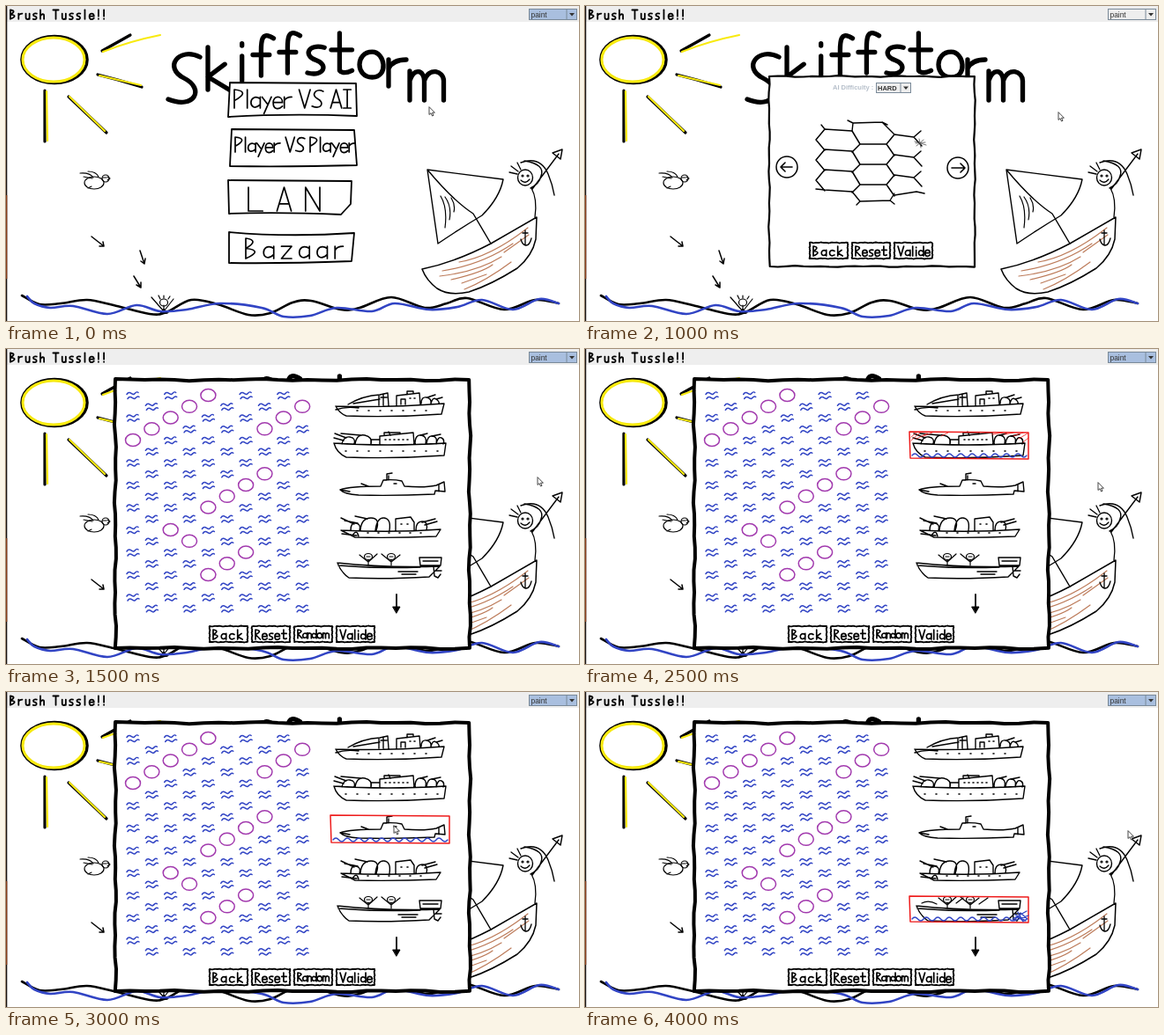
An HTML page for the animation above (4500 ms loop, 650 by 358 pixels).

```html
<!DOCTYPE html>
<html lang="en">
<head>
<meta charset="utf-8">
<title>Brush Tussle</title>
<style>
html, body { margin: 0; width: 100%; height: 100%; overflow: hidden; background: #fff; }
svg { display: block; width: 650px; height: 358px; }
path, ellipse { fill: none; stroke-linecap: round; stroke-linejoin: round; }
text { font-family: "Liberation Sans", Arial, sans-serif; font-size: 8.4px; }
.small { font-size: 7.5px; font-weight: bold; }
</style>
</head>
<body>
<svg id="stage" viewBox="0 0 650 358"></svg>
<script>
const BLUE = '#3144c4', PURPLE = '#a23aae', RED = '#ee1c1c', YELLOW = '#f8ea10', BROWN = '#bd7c5b';

// Single-stroke handwriting: cap height 10, baseline at y = 10.
const UPPER = {
  A: 'M0 10L3 0 6 10M1 7H5', B: 'M0 0V10M0 0Q7 1 0 5Q9 6 0 10', I: 'M0 0H4M2 0V10M0 10H4',
  L: 'M0 0V10H6', N: 'M0 10V0L6 10V0', P: 'M0 0V10M0 0Q9 1 0 6', R: 'M0 10V0Q8 1 0 5L5 10',
  S: 'M6 1C2-1-1 3 3 5S5 11 0 9', T: 'M0 0H6M3 0V10', V: 'M0 0L3 10 6 0', '!': 'M1 0V7M1 9.5V10'
};
const LOWER = {
  a: 'M5 5C2 3 0 5 0 7S2 11 5 8M5 4V10', c: 'M5 5C2 3 0 5 0 7S2 11 5 9',
  d: 'M5 6C2 3 0 5 0 7S2 11 5 8M5 0V10', e: 'M0 7H5C5 3 0 3 0 7S3 11 5 9',
  f: 'M5 1C2-1 2 2 2 4V10M0 5H4', h: 'M0 0V10M0 7C1 4 4 4 4 6V10', i: 'M1 4V10M1 1V1.5',
  k: 'M0 0V10M4 4L0 7 5 10', l: 'M1 0V10', m: 'M0 4V10M0 6C1 3 3 4 3 6V10M3 6C4 3 7 4 7 6V10',
  n: 'M0 4V10M0 6C1 3 4 4 4 6V10', o: 'M3 4C-1 4-1 10 3 10S6 4 3 4', r: 'M0 4V10M0 6Q1 4 4 4',
  s: 'M4 4C0 3-1 6 2 7S4 11 0 10', t: 'M2 0V9Q3 10 5 9M0 4H5', u: 'M0 4V8C0 11 4 11 4 8V4V10',
  y: 'M0 4L3 8M5 4L1 13', z: 'M0 4H5L0 10H5'
};
const GLYPHS = { ...UPPER, ...LOWER };
const WIDTHS = { ' ': 2, '!': 2, i: 2, l: 2, I: 4, h: 4, n: 4, r: 4, s: 4, u: 4, A: 6, L: 6, N: 6, S: 6, T: 6, V: 6, o: 6, m: 7 };

const path = (d, width = 1.4, color = '#000', more = '') =>
  `<path d="${d}" stroke="${color}" stroke-width="${width}" ${more}/>`;
const oval = (x, y, rx, ry = rx, width = 1.4, color = '#000') =>
  `<ellipse cx="${x}" cy="${y}" rx="${rx}" ry="${ry}" stroke="${color}" stroke-width="${width}"/>`;
const glyph = (c, x, y, scale, width) =>
  path(GLYPHS[c], width / scale, '#000', `transform="translate(${x} ${y}) scale(${scale})"`);

function write(text, x, y, scale, gap, width = 1.7) {
  let out = `<g role="img" aria-label="${text}">`;
  for (const c of text) {
    if (c !== ' ') out += glyph(c, x, y, scale, width);
    x += ((WIDTHS[c] || 5) + gap) * scale;
  }
  return out + '</g>';
}

// Smooth curve through a flat list of x, y pairs.
function curve(list) {
  const n = list.length / 2;
  const at = i => { const k = 2 * Math.max(0, Math.min(n - 1, i)); return [list[k], list[k + 1]]; };
  let d = 'M' + at(0);
  for (let i = 0; i < n - 1; i++) {
    const [a, b, c, e] = [at(i - 1), at(i), at(i + 1), at(i + 2)];
    d += `C${b.map((v, k) => v + (c[k] - a[k]) / 6)} ${c.map((v, k) => v - (e[k] - b[k]) / 6)} ${c}`;
  }
  return d;
}

// Hand-drawn box: straight sides with a slight wobble.
function sketchBox(x, y, w, h, width, wobble) {
  const points = [];
  const side = (x0, y0, dx, dy) => {
    for (let i = 0; i < 24; i++) {
      const k = i / 24, shake = wobble * (Math.sin(i * 1.9 + x0) + Math.sin(i * 0.8 + y0)) / 2;
      points.push([x0 + dx * k + (dx ? 0 : shake), y0 + dy * k + (dy ? 0 : shake)].map(v => v.toFixed(1)));
    }
  };
  side(x, y, w, 0); side(x + w, y, 0, h); side(x + w, y + h, -w, 0); side(x, y + h, 0, -h);
  return path(`M${points.join('L')}Z`, width, '#000', 'style="fill:#fff"');
}

const label = (text, x, y, more = '') => `<text x="${x}" y="${y}" ${more}>${text}</text>`;
const combo = (x, y, w, h, fill) =>
  `<rect x="${x}" y="${y}" width="${w}" height="${h}" fill="${fill}" stroke="#7a8a99"/>` +
  `<path d="M${x + w - 11.5} ${y}v${h}" stroke="#7a8a99"/>` +
  `<path d="M${x + w - 8.5} ${y + h / 2 - 1.5}h6l-3 3.5z" style="fill:#333"/>`;
const group = (id, content) => `<g id="${id}">${content}</g>`;

function scenery() {
  const rays = path('M109 51L141 33M104 78L127 84 154 92M71 103L114 144M44 96V154', 3.2) +
    path('M110 52Q140 40 175 33M106 79L153 90M72 103L112 142M46 97L47 153', 2.2, YELLOW);
  const sun = oval(55, 61, 37, 26.5, 3.6) + oval(54, 61, 35, 25, 3, YELLOW) + rays;
  const bird = oval(100, 201, 11, 7, 1.2) + oval(113, 196, 4, 4, 1.2) +
    path('M84 190Q95 189 99 195M88 194L98 196M93 188Q102 188 105 194M115 194L118 196 115 198M93 207L97 205M110 195H114', 1.1);
  const darts = path('M97 262L111 273M106 273L111 273 110 268M152 278L157 293M153 290L157 293 158 287M145 307L153 320M148 317L153 320 153 314', 1.5);
  const swimmer = oval(179, 337, 4.5, 4, 1.2) +
    path('M165 331L179 347 190 333M179 340V349M175 333L173 329M179 332V329M184 333L186 330', 1.2) +
    path('M175 349L179 344 183 349Z', 1, '#000', 'style="fill:#000"');
  const sea = path(curve([18,329, 38,339, 62,338, 92,334, 122,340, 163,350, 182,348, 210,334, 240,339, 275,351, 300,349,
      325,337, 346,335, 380,345, 401,343, 437,331, 475,343, 500,338, 523,332, 565,345, 600,334, 627,338]), 2.6) +
    path(curve([24,330, 32,338, 50,343, 76,341, 115,350, 148,340, 175,347, 205,345, 243,338, 290,343, 315,353,
      345,352, 375,343, 415,347, 441,338, 480,345, 512,342, 540,334, 575,345, 605,333, 627,338]), 2.6, BLUE);
  const sail = path('M478 186L564 197Q560 218 540 238Q515 253 490 270L478 186M478 186Q507 221 530 236L550 270', 1.4) +
    path('M493 216Q501 229 498 252M498 217Q506 228 503 243M505 218Q510 226 508 234', 1.2);
  const hull = path('M472 299Q510 291 550 270L602 240 601 265Q597 284 580 298Q550 317 525 325Q503 330 489 321Q477 312 472 299', 1.5) +
    path('M514 291Q550 285 592 252M495 301Q540 294 575 270M492 307Q535 302 562 285M505 311Q540 303 552 294M517 315L545 305M520 322Q545 312 573 291M565 280L593 260', 1.2, BROWN) +
    path('M589 255V272M584 265Q586 272 590 272T596 264M586 258H592', 1.3);
  const archer = oval(589, 195, 8.5, 9, 1.4) + oval(586, 193, 1, 1, 1.2) + oval(592, 193, 1, 1, 1.2) +
    path('M584 198Q589 203 594 197M581 188L573 182M580 191L571 189M584 186L580 178M600 240Q603 219 596 207', 1.3) +
    path('M584 178Q606 170 615 191Q620 203 622 215M588 176Q612 180 607 193Q605 202 595 207M597 208L627 168M620 167L631 163 629 174Z', 1.4);
  return sun + bird + darts + swimmer + sea + sail + hull + archer;
}

function menu() {
  const box = d => path(d, 1.8, '#000', 'style="fill:#fff"');
  return box('M254 87L397 88 398 125Q320 122 252 126Z') + write('Player VS AI', 259, 95, 2.1, 1) +
    box('M256 140L395 141 398 181Q320 183 254 182Z') + write('Player VS Player', 260, 149, 1.7, 0.8) +
    box('M252 198L392 199 391 225 380 237Q310 234 253 236Z') + write('LAN', 275, 206, 2.7, 6) +
    box('M253 257Q320 263 395 258L392 290Q310 293 253 292Z') + write('Bazaar', 272, 264, 2.3, 3.8);
}

const title = () => [['S', 184, 52, 6], ['k', 229, 47, 4.8], ['i', 263, 38, 4.7], ['f', 280, 32, 4.7], ['f', 310, 29, 4.7],
  ['s', 342, 28, 4.8], ['t', 369, 31, 4.7], ['o', 401, 33, 4.8], ['r', 434, 41, 5], ['m', 458, 52, 5.5]]
  .map(l => glyph(...l, 5.3)).join('');

const button = (text, x, y, gap, scale = 1.1) => sketchBox(x, y, 43, 18, 1.8, 0.5) + write(text, x + 4, y + 4, scale, gap);

function mapDialog() {
  let hexes = path('M303 142L304 133 337 132 351 146M304 133L298 130M337 132L343 135M272 140L268 135M303 211L312 222 346 221 351 213M312 222L308 226M346 221L351 225');
  for (let i = 0; i < 4; i++) {
    const edges = i < 3
      ? 'M262 152L272 140 303 142 312 157 342 157 351 146 373 149 381 142M262 152L272 164M312 157L303 166M342 157L351 170M373 149L382 159'
      : 'M262 139L272 140 303 142M351 146L376 142 385 144';
    hexes += path(edges, 1.5, '#000', `transform="translate(0 ${23 * i})"`);
  }
  hexes += path('M374 154L387 158M376 159L384 152M379 151L381 161M375 156L386 155', 0.8, '#555');
  return sketchBox(209, 80, 233, 216, 2.2, 0.8) +
    label('AI Difficulty :', 281, 95, 'class="small" fill="#b6bfca"') +
    combo(330.5, 87.5, 39, 11, '#eee') + label('HARD', 332, 96, 'class="small" fill="#333"') +
    hexes + oval(229, 183, 12, 12, 1.5) + oval(423, 184, 12, 12, 1.5) +
    path('M222 183H235M227 178L222 183 227 188M416 184H431M426 179L431 184 426 189', 1.6) +
    button('Back', 255, 269, 3.4) + button('Reset', 303, 269, 2) + button('Valide', 351, 269, 1.6);
}

function ships() {
  const portholes = (x, y, n, step) => path(Array.from({ length: n }, (_, i) => `M${x + i * step} ${y}h1`).join(''), 1.6);
  const cruiser = path('M374 65Q430 67 497 62L494 74Q440 78 386 76Q378 73 374 65M374 69Q385 65 400 67M388 63Q405 53 424 52L433 50 434 64M394 62L424 57M423 52V64M428 51V64M432 55H425M443 64V53L469 50 470 63M448 63V57H453V63M455 52V48H462V51M471 62Q471 54 477 55T482 62M482 62Q484 54 488 57T491 62M478 55L487 52M488 57L495 55') +
    portholes(398, 70, 7, 13) + portholes(458, 56, 2, 5);
  const destroyer = path('M372 107Q430 111 499 107L497 121Q440 125 386 123Q375 118 372 107M381 108Q383 99 390 100T395 108M396 108Q398 96 407 98T414 108M414 108V103H424M424 108V99L462 95 463 108M429 98V95H447V97M464 108Q464 97 471 98T476 108M477 108Q478 98 484 99T488 108M488 108Q490 99 494 101T496 108') +
    path('M386 101L373 96M383 104L372 101M402 98L380 96M470 98L478 96M483 99L493 97M436 98L434 94') +
    portholes(385, 116, 9, 13) + portholes(430, 103, 6, 5);
  const submarine = path('M379 160Q390 156 425 156L428 149Q440 148 449 150L452 156Q475 158 488 155L497 151 498 162 487 161 486 165Q440 167 400 166Q384 165 379 160M432 149V142L438 141M434 149V144M403 153L411 156M491 154V162M379 160L390 162M440 153H443');
  const gunboat = path('M380 206Q440 209 493 205L488 213Q440 215 396 214L380 206M391 206Q391 197 397 198T401 206M402 206Q403 192 414 192T420 206M419 206Q421 191 429 192T435 206M442 206V193L459 191 463 197V206M465 206Q465 196 472 196T477 206') +
    path('M395 199L380 192M399 198L384 195M410 193L396 190M472 197L487 193M475 200L489 196M381 210L398 212M393 212Q398 204 400 213') +
    portholes(410, 209, 6, 12) + portholes(448, 199, 2, 7);
  const boat = path('M376 243Q430 249 492 247L480 259Q430 262 389 260Q380 254 376 243M377 246Q425 250 470 248M469 237H494L493 246H470ZM473 241H490M485 247L486 258 490 260 493 256M488 252H494M445 253H467M449 256H465') +
    oval(411, 236, 4.5, 3.5, 1.2) + oval(437, 236, 4.5, 3.5, 1.2) +
    path('M411 240V246M401 234L411 242 421 233M437 240V246M426 233L437 242 447 234M409 236H413M435 236H439', 1.2);
  return cruiser + destroyer + submarine + gunboat + boat;
}

function fleetPanel() {
  const hits = new Set('40 30 21 11 02 90 81 71 73 64 54 45 26 36 67 57 48'.split(' '));
  let cells = '';
  for (let col = 0; col < 10; col++) for (let row = 0; row < 10; row++) {
    const x = 144 + col * 21.35, y = 52.5 + row * 25.5 + (col % 2) * 12.8;
    cells += hits.has(`${col}${row}`) ? oval(x, y, 8.5, 7, 1.5, PURPLE)
      : path('M-7-1C-4-6-1 0 1-1S4-5 6-3M-6 4C-3-1 0 5 2 4S5 0 7 2', 1.5, BLUE, `transform="translate(${x} ${y})"`);
  }
  return sketchBox(124, 35, 402, 305, 4, 1.2) + cells + ships() +
    path('M443 279V296', 1.8) + path('M439 293H447L443 300Z', 1, '#000', 'style="fill:#000"') +
    button('Back', 231, 315, 3.4) + button('Reset', 279, 315, 2) + button('Random', 327, 315, 0.9, 0.97) + button('Valide', 375, 315, 1.6);
}

// Red frame around one ship, with water under it.
function highlight(y, h, extra = '') {
  const water = 'q3-4 6.5 0t6.5 0'.repeat(10);
  return path(`M368 ${y}L503 ${y + 1} 503 ${y + h} 369 ${y + h - 1}Z`, 1.5, RED) +
    path(`M371 ${y + h - 4}${water}`, 1.3, BLUE) + extra;
}
const burst = (x, y) => path(`M${x - 6} ${y}q5-6 12-2q-4 6-11 3l9-5m-8 0l7 5`, 1, RED);
const highlights = [
  highlight(48, 31),
  highlight(94, 31, path('M370 104L380 95M370 100L376 95M376 102L388 96M384 99L394 95M404 99L412 95M462 97L474 95M476 97L486 95M486 99L497 95M492 102L502 96M497 106L503 101', 0.8, RED)),
  highlight(140, 32),
  highlight(186, 30, burst(378, 192) + burst(404, 190) + burst(488, 191) + path('M488 197L498 193M490 213L503 207', 1, RED)),
  highlight(232, 30, path('M485 258L501 249M487 260L503 254M488 253L500 260M491 250L497 261M494 251L502 258', 1.3, BLUE) +
    path('M421 240L429 234M447 241L457 234M382 240Q390 236 399 241', 1.2))
];

const stage = document.getElementById('stage');
stage.innerHTML = '<rect width="650" height="358" fill="#fff"/>' + scenery() + title() +
  group('menu', menu()) + group('mapDialog', mapDialog()) + group('fleetPanel', fleetPanel()) + group('highlight', '') +
  '<rect width="650" height="18" fill="#eee"/><rect width="1.3" height="358" fill="#17110f"/><rect y="215" width="1.3" height="95" fill="#8a3d18"/>' +
  write('Brush Tussle!!', 5, 4.5, 1.03, 4, 1.8) +
  group('theme', '') + label('paint', 595.5, 12.5, 'fill="#333"') +
  '<path id="cursor" d="M0 0V8.5L2 6.7 3.5 10 5 9.3 3.5 6.2H6Z" stroke="#333" stroke-width=".9" style="fill:#fff"/>';

const STEP = 500;
const cursorStops = [[480, 115], [508, 119], [537, 121], [603, 146], [444, 60], [582, 152], [440, 152], [433, 189], [616, 158]];
const el = id => document.getElementById(id);
let shown = -1;

function draw(now) {
  const step = Math.floor(now / STEP) % cursorStops.length;
  if (step !== shown) {
    shown = step;
    const show = (id, on) => { el(id).style.display = on ? '' : 'none'; };
    show('menu', step < 1);
    show('mapDialog', step === 1 || step === 2);
    show('fleetPanel', step > 2);
    el('highlight').innerHTML = highlights[step - 4] || '';
    el('theme').innerHTML = combo(593.5, 3.5, 54, 12, step === 1 || step === 2 ? '#eee' : '#a9bfdf');
    el('cursor').setAttribute('transform', `translate(${cursorStops[step]})`);
  }
  requestAnimationFrame(() => draw(performance.now()));
}
draw(performance.now());
</script>
</body>
</html>
```
